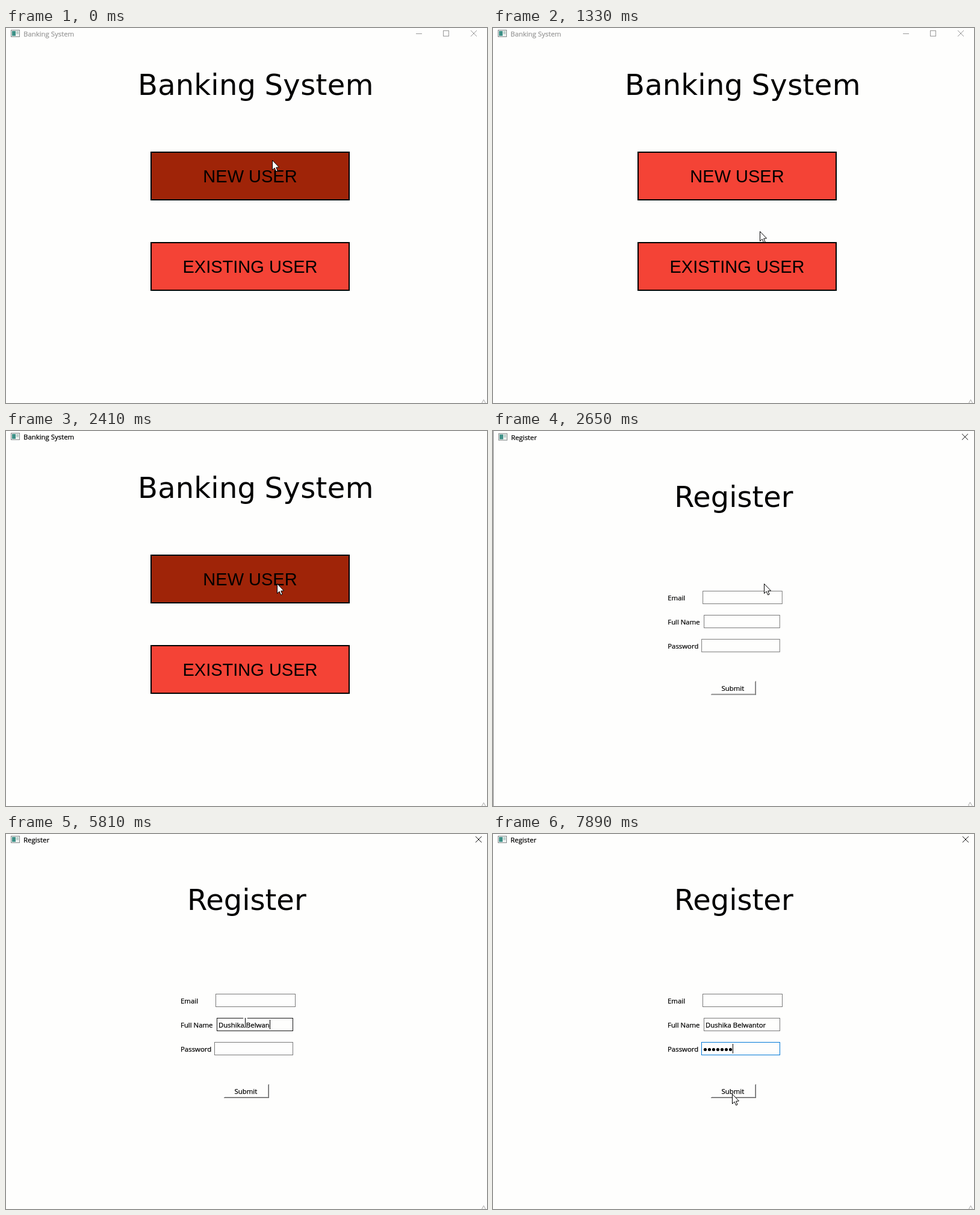
An HTML page with a canvas that plays this animation: 799x622 px, repeating every 8000 ms.

```html
<!DOCTYPE html>
<html lang="en">
<head>
<meta charset="utf-8">
<title>Banking System</title>
<style>
html, body { margin: 0; width: 100%; height: 100%; overflow: hidden; background: #fefefd; }
canvas { display: block; }
</style>
</head>
<body>
<canvas id="stage" width="799" height="622"></canvas>
<script>
const ctx = document.getElementById('stage').getContext('2d');
const LOOP = 8000, TICK = 121.4, LEAD = 30;
const W = 799, H = 622, MID = 405.5;
const PAPER = '#fefefd';
const UI = '11.4px "Open Sans", "Noto Sans", sans-serif';
const HEAD = '48px "DejaVu Sans", sans-serif';
const LABEL = '29px "Liberation Sans", Arial, sans-serif';
const NAME = 'Dushika Belwantor';

const ACTIVATE = 19, OPEN = 20, OPENED = 23, NAME_FOCUS = 32;
const FIRST_WORD = 36, SECOND_WORD = 44, PASS_FOCUS = 54, PASS_TYPED = 59;

// Turning points of the pointer: tick, x, y.
const PATH = [
  [0, 442, 219], [4, 437, 385], [5, 437, 385], [7, 437, 348], [9, 443, 255],
  [12, 443, 378], [14, 444, 333], [18, 450, 253], [23, 450, 253],
  [27, 430, 272], [32, 397, 313], [62, 397, 313], [65, 397, 431]
];

const button = (text, y) => ({ text, box: [240, y, 331, 81] });
const BUTTONS = [button('NEW USER', 205), button('EXISTING USER', 355)];
const field = (text, x, y, w) => ({ text, box: [x, y, w, 22] });
const FIELDS = [
  field('Email', 348, 265, 133),
  field('Full Name', 350, 305, 127),
  field('Password', 346, 345, 131)
];

const clamp = (v, lo, hi) => Math.max(lo, Math.min(hi, v));
const inside = (p, [x, y, w, h]) => p.x >= x && p.x < x + w && p.y >= y && p.y < y + h;

function pointerAt(n) {
  const i = PATH.findIndex(key => key[0] > n);
  const [t0, x0, y0] = PATH.at(i < 0 ? -1 : i - 1);
  const [t1, x1, y1] = PATH.at(i);
  const k = i < 0 ? 0 : (n - t0) / (t1 - t0);
  return { x: Math.round(x0 + (x1 - x0) * k), y: Math.round(y0 + (y1 - y0) * k) };
}

function typedName(n) {
  if (n < FIRST_WORD) return '';
  const limit = n < SECOND_WORD ? NAME.indexOf(' ') + 1 : NAME.length;
  return NAME.slice(0, Math.min(n - FIRST_WORD + 2, limit));
}

function fill(color, x, y, w, h) {
  ctx.fillStyle = color;
  ctx.fillRect(x, y, w, h);
}

function frame(color, x, y, w, h) {
  ctx.strokeStyle = color;
  ctx.lineWidth = 1;
  ctx.strokeRect(x + 0.5, y + 0.5, w - 1, h - 1);
}

function write(str, x, y, font, { color = '#000', align = 'left', spacing = 0 } = {}) {
  ctx.font = font;
  ctx.fillStyle = color;
  ctx.textAlign = align;
  ctx.letterSpacing = spacing + 'px';
  ctx.fillText(str, x, y);
}

// Small interface text is slightly thickened.
function label(str, x, y, color = '#000') {
  write(str, x, y, UI, { color });
  ctx.strokeStyle = color;
  ctx.lineWidth = 0.25;
  ctx.strokeText(str, x, y);
}

function line(color, ...points) {
  ctx.strokeStyle = color;
  ctx.lineWidth = 1;
  ctx.beginPath();
  points.forEach(([x, y]) => ctx.lineTo(x, y));
  ctx.stroke();
}

function cross(x, y, color) {
  line(color, [x - 5, y - 5], [x + 5, y + 5]);
  line(color, [x - 5, y + 5], [x + 5, y - 5]);
}

function chrome(title, color) {
  fill(PAPER, 0, 0, W, H);
  fill('#eef0ef', 8, 3, 15, 12);
  fill('#3f9188', 10, 5, 6, 8);
  fill('#bcd2cd', 17, 5, 4, 5);
  frame('#858b8c', 8, 3, 15, 12);
  label(title, 29, 14, color);
  line('#a5a5a5', [790.5, 622], [793.5, 616.5], [796.5, 622]);
}

function home(n, p) {
  const ink = n >= ACTIVATE ? '#000' : '#999';
  chrome('Banking System', ink);
  if (n < OPEN) {
    fill(ink, 681, 9, 10, 1);
    frame(ink, 726, 4, 10, 10);
    cross(777, 9, ink);
  }
  write('Banking', 219, 111, HEAD, { spacing: 0.2 });
  write('System', 429.5, 111, HEAD, { spacing: 0.4 });
  for (const { text, box } of BUTTONS) {
    const [x, y, w, h] = box;
    fill('#000', x, y, w, h);
    fill(inside(p, box) ? '#9f2408' : '#f44336', x + 2, y + 2, w - 4, h - 4);
    write(text, MID, y + 51, LABEL, { align: 'center' });
  }
}

function register(n, p) {
  chrome('Register', '#000');
  cross(785, 9, '#111');
  write('Register', 301, 126, HEAD);

  const focus = n >= PASS_FOCUS ? 2 : n >= NAME_FOCUS ? 1 : -1;
  FIELDS.forEach(({ text, box }, i) => {
    const border = inside(p, box) ? '#171717' : i === focus ? '#0078d7' : '#7a7a7a';
    label(text, 290, box[1] + 16);
    frame(border, ...box);
  });

  const name = typedName(n);
  label(name, 353, 321);
  if (focus === 1) fill('#000', Math.round(353 + ctx.measureText(name).width), 308, 1, 16);

  const dots = n < PASS_TYPED ? 0 : Math.min(2 * (n - PASS_TYPED) + 3, 7);
  ctx.fillStyle = '#000';
  for (let i = 0; i < dots; i++) {
    ctx.beginPath();
    ctx.arc(352.5 + 7 * i, 357.5, 2.6, 0, 7);
    ctx.fill();
  }
  if (focus === 2) fill('#000', 349 + 7 * dots, 348, 1, 16);

  fill('#a0a0a0', 363, 436, 73, 1);
  fill('#a0a0a0', 435, 416, 1, 21);
  fill('#696969', 362, 437, 75, 1);
  fill('#696969', 436, 415, 1, 23);
  label('Submit', 379.5, 431);
}

function arrow({ x, y }) {
  ctx.beginPath();
  [[0, 0], [0, 16], [3.6, 12.6], [6.2, 18.4], [8.6, 17.4], [6.2, 11.8], [11, 11.4]]
    .forEach(([dx, dy]) => ctx.lineTo(x + 0.5 + dx, y + 0.5 + dy));
  ctx.closePath();
  ctx.fillStyle = '#fff';
  ctx.fill();
  ctx.strokeStyle = '#000';
  ctx.lineWidth = 1;
  ctx.stroke();
}

// Text pointer inverts what lies under it.
function beam({ x, y }) {
  ctx.globalCompositeOperation = 'difference';
  for (const dy of [-8, 7]) {
    fill('#fff', x - 3, y + dy, 3, 1);
    fill('#fff', x + 1, y + dy, 3, 1);
  }
  fill('#fff', x, y - 7, 1, 14);
  ctx.globalCompositeOperation = 'source-over';
}

function draw(t) {
  const n = Math.floor((t + LEAD) / TICK);
  const p = pointerAt(n);
  const open = clamp((n - OPEN) / (OPENED - OPEN), 0, 1);

  if (open < 1) home(n, p);
  if (open > 0) {
    const scale = 1 - 0.2 * (1 - open) ** 4;
    ctx.save();
    ctx.globalAlpha = Math.min(1, 1.6 * open);
    ctx.translate(W / 2, H / 2);
    ctx.scale(scale, scale);
    ctx.translate(-W / 2, -H / 2);
    register(n, p);
    ctx.restore();
    if (open < 1) fill('#888', 0, 0, 1, H);
  }

  const overField = open === 1 && FIELDS.some(f => inside(p, f.box));
  (overField ? beam : arrow)(p);
}

function tick() {
  draw(performance.now() % LOOP);
  requestAnimationFrame(tick);
}
tick();
</script>
</body>
</html>
```
